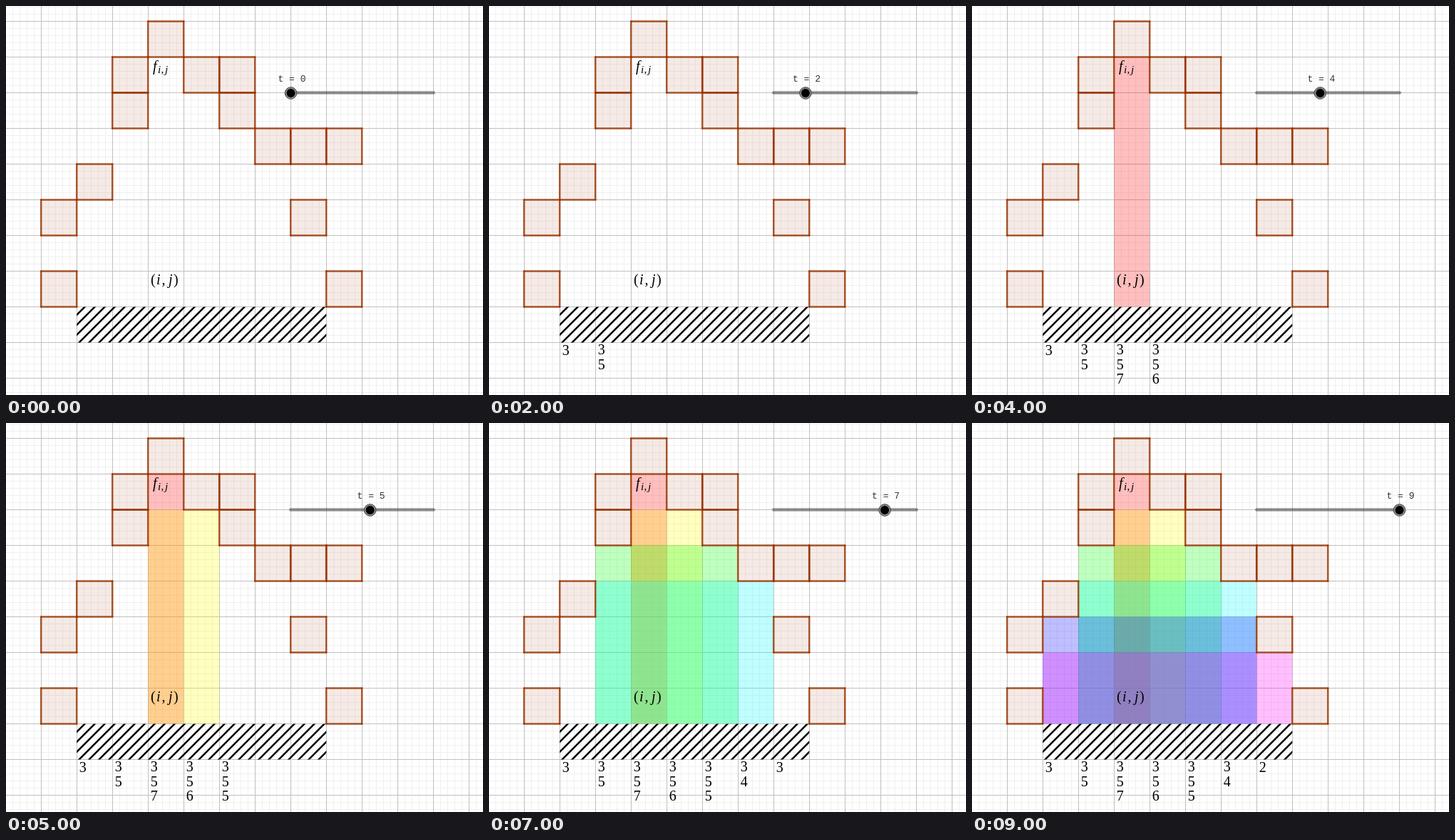
These frames come from a looping animation (669x545 px, 10000 ms). An HTML page:

```html
<!DOCTYPE html>
<html lang="en">
<head>
<meta charset="utf-8">
<title>Largest rectangle with a stack</title>
<style>
  html, body { margin: 0; width: 100%; height: 100%; overflow: hidden; background: #fff; }
  svg { display: block; width: 669px; height: 545px; }
  .math { font: 20px "Liberation Serif", "Times New Roman", serif; }
  .math .it { font-style: italic; }
  .math .sub { font-size: 15px; }
  .mono { font: 13px "Liberation Mono", "Courier New", monospace; fill: #333; }
</style>
</head>
<body>
<svg id="stage" viewBox="0 0 669 545" xmlns="http://www.w3.org/2000/svg"></svg>
<script>
const STEP = 1000, STEPS = 10;
const CELL = 50, LEFT = 49.2, FLOOR = 421.4;
const stage = document.getElementById("stage");

function add(tag, attrs, parent = stage) {
  const el = document.createElementNS("http://www.w3.org/2000/svg", tag);
  for (const key in attrs) el.setAttribute(key, attrs[key]);
  parent.append(el);
  return el;
}
function label(x, y, text, cls, parent) {
  const el = add("text", { x, y, class: cls }, parent);
  el.textContent = text;
  return el;
}
const colX = col => LEFT + col * CELL;
const rowY = row => FLOOR - row * CELL;

// Background grid
function gridPath(isMajor) {
  let d = "";
  for (let k = -5; k < 64; k++) {
    if ((k % 5 === 0) !== isMajor) continue;
    d += `M${49.5 + k * 10} 0V545M0 ${21.5 + k * 10}H669`;
  }
  return d;
}
add("path", { d: gridPath(false), stroke: "#f0f0f0" });
add("path", { d: gridPath(true), stroke: "#c0c0c0" });

// Rectangles found when a height is popped: step, first column, end column, height
const areas = [
  [4, 3, 4, 7, "#f00"],
  [5, 3, 5, 6, "#ff0"],
  [6, 2, 6, 5, "#0f0"],
  [7, 2, 7, 4, "#0ff"],
  [8, 1, 7, 3, "#00f"],
  [9, 1, 8, 2, "#f0f"]
].map(([from, start, end, height, color]) => ({
  from, to: STEPS,
  el: add("rect", {
    x: colX(start), y: rowY(height),
    width: (end - start) * CELL, height: height * CELL,
    fill: color, "fill-opacity": 0.25
  })
}));

// Hatched floor
const clip = add("clipPath", { id: "floor" });
add("rect", { x: colX(1), y: FLOOR, width: 7 * CELL, height: CELL }, clip);
let hatch = "";
for (let sum = 518; sum < 930; sum += 14) hatch += `M${sum - 415} 415L${sum - 477} 477`;
add("path", { d: hatch, stroke: "#000", "stroke-width": 2.5, "clip-path": "url(#floor)" });

// Obstacles: column and height of the lower edge
const blocks = [[3, 7], [2, 6], [4, 6], [5, 6], [2, 5], [5, 5], [6, 4], [7, 4], [8, 4],
  [1, 3], [0, 2], [7, 2], [0, 0], [8, 0]];
for (const [col, row] of blocks) {
  const x = colX(col), y = rowY(row + 1);
  add("rect", { x, y, width: CELL, height: CELL, fill: "#930", "fill-opacity": 0.1 });
  const sides = [[0, 0, 1, 0], [1, 0, 1, 1], [1, 1, 0, 1], [0, 1, 0, 0]];
  for (const [x1, y1, x2, y2] of sides) {
    add("line", {
      x1: x + x1 * CELL, y1: y + y1 * CELL, x2: x + x2 * CELL, y2: y + y2 * CELL,
      stroke: "#930", "stroke-opacity": 0.8, "stroke-width": 2.5, "stroke-linecap": "round"
    });
  }
}

// Formulas
label(206, 91, "f", "math it").style.fontStyle = "italic";
const index = add("g", { class: "math" });
label(213, 94, "i", "it sub", index);
label(217.5, 94, ",", "sub", index);
label(223, 94, "j", "it sub", index);
const pair = add("g", { class: "math" });
label(203, 390, "(", "", pair);
label(211, 390, "i", "it", pair);
label(218.5, 390, ",", "", pair);
label(228, 390, "j", "it", pair);
label(235, 390, ")", "", pair);

// Stack contents under each column: first step, end step, column, heights
const stacks = [
  [1, 10, 1, "3"], [2, 10, 2, "35"], [3, 10, 3, "357"], [4, 10, 4, "356"],
  [5, 10, 5, "355"], [6, 10, 6, "34"], [7, 8, 7, "3"], [8, 10, 7, "2"]
].map(([from, to, col, heights]) => {
  const el = add("g", { class: "math" });
  const top = heights.length > 1 ? 488.3 : 489;
  [...heights].forEach((h, i) => label(colX(col) + 3.6, top + i * 20.4, h, "", el));
  return { from, to, el };
});

// Slider
add("line", {
  x1: 399.2, y1: 121.5, x2: 599.7, y2: 121.5,
  stroke: "#000", "stroke-opacity": 0.4, "stroke-width": 4.5, "stroke-linecap": "round"
});
const knob = add("g", {});
add("circle", { cx: 399.5, cy: 122, r: 8.3, fill: "#888", stroke: "#444" }, knob);
add("circle", { cx: 399.5, cy: 122, r: 6, fill: "#000" }, knob);
const counter = label(381.5, 106, "", "mono", knob);

const timed = [...areas, ...stacks];
let shown = -1;
function show(step) {
  if (step === shown) return;
  shown = step;
  for (const { from, to, el } of timed) {
    el.setAttribute("visibility", step >= from && step < to ? "visible" : "hidden");
  }
  knob.setAttribute("transform", `translate(${step * 200 / 9} 0)`);
  counter.textContent = `t = ${step}`;
}

const start = performance.now();
function tick() {
  show(Math.floor((performance.now() - start) / STEP) % STEPS);
  requestAnimationFrame(tick);
}
show(0);
requestAnimationFrame(tick);
</script>
</body>
</html>
```
